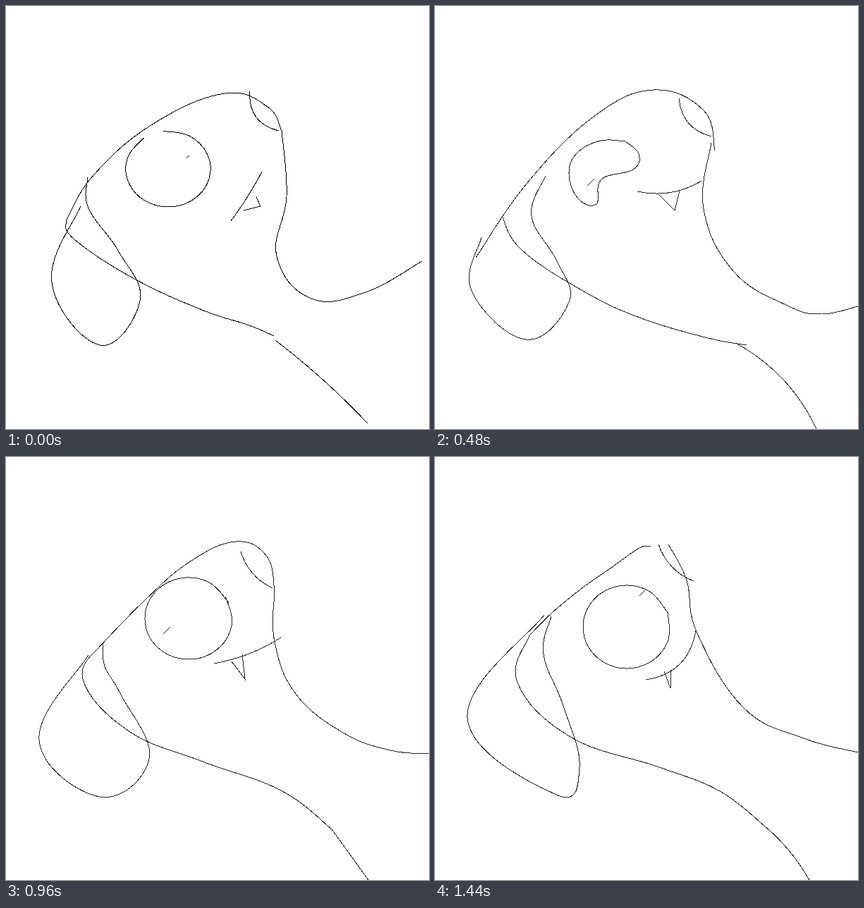
Write an HTML page that moves like this. It is 600 by 600 pixels and loops after 1560 ms.

```html
<!DOCTYPE html>
<html lang="en">
<head>
<meta charset="utf-8">
<title>Line-drawn dog</title>
<style>
  html, body { margin: 0; width: 100%; height: 100%; overflow: hidden; background: #fff; }
  svg { display: block; width: 600px; height: 600px; }
  path { fill: none; stroke-width: 1; shape-rendering: crispEdges; }
</style>
</head>
<body>
<svg id="stage" viewBox="0 0 600 600"></svg>
<script>
const STEP = 120, STEPS = 13;
const stage = document.getElementById('stage');
const strokes = [];

// One row per key pose; poses are two steps apart.
function add(draw, poses) {
  const path = stage.appendChild(document.createElementNS(stage.namespaceURI, 'path'));
  strokes.push({ path, draw, poses });
}

const pairs = row => row.flatMap((v, i) => i % 2 ? [] : [[v, row[i + 1]]]);

const polyline = row => 'M' + pairs(row).join('L');

// Smooth curve through all points
function spline(row) {
  const pts = pairs(row), last = pts.length - 1;
  const handle = (p, from, to) => p.map((v, j) => v + (to[j] - from[j]) / 5);
  let d = 'M' + pts[0];
  for (let i = 0; i < last; i++) {
    const a = pts[i], b = pts[i + 1];
    const before = pts[Math.max(0, i - 1)], after = pts[Math.min(last, i + 2)];
    d += `C${handle(a, before, b)} ${handle(b, after, a)} ${b}`;
  }
  return d;
}

// Curve between two ends, pushed sideways by a share of its length
function bow([x1, y1, x2, y2, bend]) {
  const cx = (x1 + x2) / 2 + (y2 - y1) * bend;
  const cy = (y1 + y2) / 2 - (x2 - x1) * bend;
  return `M${x1},${y1}Q${cx},${cy} ${x2},${y2}`;
}

const tick = ([x, y, r]) => `M${x + r},${y - r}L${x - r},${y + r}`;

// Ten points around an ellipse, counterclockwise, angles in degrees
function oval(cx, cy, rx, ry, from, sweep) {
  return Array.from({ length: 10 }, (_, i) => {
    const a = (from - sweep * i / 9) * Math.PI / 180;
    return [cx + rx * Math.cos(a), cy + ry * Math.sin(a)];
  }).flat();
}

const ear = [
  [106, 284, 65, 392, 133, 481, 190, 418, 159, 347, 117, 287, 116, 243],
  [106, 268, 61, 383, 134, 476, 190, 420, 178, 368, 136, 314, 128, 255],
  [66, 328, 52, 404, 129, 473, 190, 420, 173, 362, 137, 298, 157, 241],
  [104, 279, 39, 386, 128, 470, 195, 413, 158, 328, 138, 262, 180, 237],
  [117, 281, 47, 401, 133, 482, 203, 428, 163, 337, 140, 297, 138, 264],
  [138, 252, 60, 371, 158, 477, 209, 440, 185, 349, 153, 290, 160, 243],
  [155, 224, 46, 370, 172, 479, 205, 440, 182, 353, 154, 280, 165, 226]
];
add(spline, ear);

const skull = [
  [85, 305, 125, 239, 209, 167, 310, 124, 371, 143, 391, 177],
  [101, 296, 125, 245, 204, 174, 300, 120, 366, 136, 391, 164],
  [58, 357, 130, 252, 225, 157, 310, 119, 381, 148, 397, 205],
  [63, 349, 133, 253, 211, 173, 296, 131, 376, 153, 390, 212],
  [127, 275, 195, 205, 260, 149, 326, 120, 370, 141, 381, 190],
  [137, 252, 206, 187, 262, 146, 319, 115, 354, 135, 368, 190],
  [134, 253, 166, 221, 206, 188, 250, 157, 290, 129, 306, 127]
];
add(spline, skull);

const throat = [
  [391, 177, 398, 270, 384, 355, 433, 415, 510, 406, 590, 362],
  [371, 153, 391, 220, 382, 319, 433, 403, 515, 420, 600, 387],
  [392, 194, 381, 288, 424, 377, 500, 425, 548, 437, 600, 426],
  [382, 200, 381, 265, 409, 344, 478, 405, 552, 425, 600, 423],
  [381, 190, 381, 262, 411, 336, 478, 391, 545, 416, 600, 421],
  [368, 190, 376, 262, 408, 325, 488, 384, 545, 407, 600, 418],
  [331, 124, 357, 175, 372, 250, 438, 356, 523, 399, 600, 419]
];
add(spline, throat);

const jaw = [
  [85, 305, 97, 331, 182, 387, 278, 431, 345, 453, 380, 468],
  [101, 282, 102, 328, 187, 392, 285, 433, 357, 455, 424, 475],
  [95, 298, 123, 346, 208, 403, 290, 442, 387, 471, 442, 481],
  [104, 265, 100, 325, 192, 399, 293, 442, 374, 469, 430, 491],
  [138, 263, 109, 315, 173, 388, 279, 432, 390, 473, 462, 528],
  [138, 252, 109, 310, 185, 389, 309, 433, 416, 484, 499, 564],
  [134, 253, 117, 320, 192, 397, 318, 440, 404, 474, 467, 523]
];
add(spline, jaw);

const nape = [
  [382, 474, 513, 592, .04],
  [408, 461, 561, 598, .02],
  [430, 480, 541, 600, .16],
  [430, 491, 504, 600, .11],
  [462, 528, 514, 600, 0],
  [471, 539, 517, 600, .12],
  [467, 523, 531, 600, .09]
];
add(bow, nape);

const nose = [
  [346, 121, 387, 177, -.42],
  [344, 124, 385, 181, -.4],
  [346, 131, 392, 185, -.35],
  [344, 135, 390, 197, -.35],
  [333, 134, 378, 186, -.22],
  [319, 116, 380, 170, -.45],
  [317, 124, 367, 176, -.23]
];
add(bow, nose);

const mouth = [
  [363, 235, 319, 305, .04],
  [378, 233, 291, 291, .18],
  [378, 248, 287, 263, .2],
  [389, 252, 301, 273, .13],
  [390, 256, 295, 293, .1],
  [390, 250, 304, 308, .13],
  [370, 246, 299, 316, .36]
];
add(bow, mouth);

const eye = [
  oval(230, 231, 60, 54, 235, 332),
  oval(227, 231, 60, 56, 237, 338),
  [270, 192, 235, 191, 202, 208, 190, 238, 203, 273, 229, 281, 236, 246, 281, 232, 289, 210, 270, 192],
  [312, 192, 285, 170, 240, 182, 199, 221, 187, 262, 212, 277, 248, 262, 273, 217, 288, 204, 306, 202],
  oval(259, 229, 62, 58, 338, 370),
  oval(272, 237, 60, 58, 357, 385),
  oval(272, 241, 62, 59, 340, 360)
];
add(spline, eye);

const pupil = [
  [258, 214, 2],
  [247, 229, 2],
  [221, 250, 5],
  [201, 265, 4],
  [228, 246, 5],
  [267, 217, 2],
  [294, 193, 4]
];
add(tick, pupil);

const tooth = [
  [355, 271, 361, 284, 337, 290],
  [353, 267, 355, 290, 329, 286],
  [347, 262, 340, 290, 317, 267],
  [343, 270, 336, 304, 319, 280],
  [335, 280, 339, 315, 320, 290],
  [335, 288, 343, 330, 328, 301],
  [335, 302, 334, 328, 325, 304]
];
add(polyline, tooth);

const midway = (a, b) => a.map((v, i) => (v + b[i]) / 2);

function render(step) {
  const k = step >> 1;
  stage.setAttribute('stroke', step ? '#222' : '#000');
  for (const { path, draw, poses } of strokes) {
    path.setAttribute('d', draw(step % 2 ? midway(poses[k], poses[k + 1]) : poses[k]));
  }
}

const start = performance.now();
let shown = 0;
function loop() {
  const step = Math.floor(Math.max(0, performance.now() - start) / STEP) % STEPS;
  if (step !== shown) render(shown = step);
  requestAnimationFrame(loop);
}
render(0);
requestAnimationFrame(loop);
</script>
</body>
</html>
```
